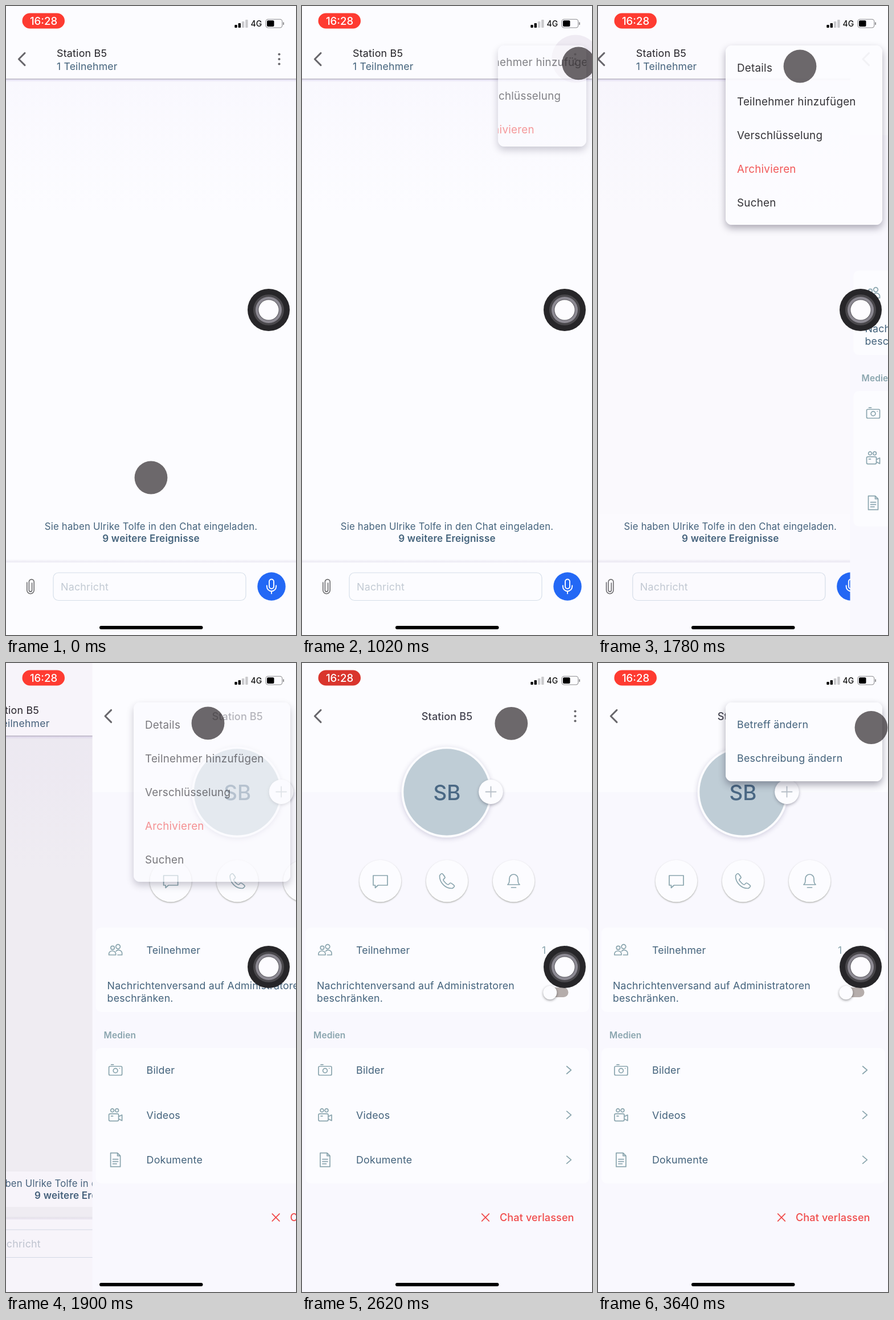
Animation of 509 by 1101 pixels, one loop 3660 ms. Source, as an HTML page with a canvas:

```html
<!DOCTYPE html>
<html lang="de">
<head>
<meta charset="utf-8">
<title>Chat</title>
<style>
html, body { margin: 0; width: 100%; height: 100%; overflow: hidden; background: #fcfcff; }
canvas { display: block; width: 509px; height: 1101px; }
</style>
</head>
<body>
<canvas id="stage"></canvas>
<script>
const W = 509, H = 1101, LOOP = 3660;
const canvas = document.getElementById('stage');
const ctx = canvas.getContext('2d');
const dpr = window.devicePixelRatio || 1;
canvas.width = W * dpr;
canvas.height = H * dpr;

const PAPER = '#fcfcff', TINT = '#f9f8fe', SLATE = '#44637c', ICON = '#8aa5ae',
      RED = '#f04c4c', GREY = '#68676c', INK = '#242328';
const SLIDE_AT = 1756;

const clamp = (v, a = 0, b = 1) => Math.min(b, Math.max(a, v));
const ramp = (t, from, span) => clamp((t - from) / span);
const smooth = u => u * u * (3 - 2 * u);
const mix = (a, b, u) => a + (b - a) * u;

// Fast start, long settling: cubic bezier (.35,.91) (.33,.97)
function settle(x) {
  const bez = (u, a, b) => 3 * u * (1 - u) ** 2 * a + 3 * u * u * (1 - u) * b + u ** 3;
  let lo = 0, hi = 1;
  for (let i = 0; i < 24; i++) {
    const mid = (lo + hi) / 2;
    if (bez(mid, 0.35, 0.33) < x) lo = mid; else hi = mid;
  }
  return bez(lo, 0.91, 0.97);
}

// y is the middle of the capital letters
function label(str, x, y, size, color, { weight = 400, align = 'left', gap = 0 } = {}) {
  ctx.font = `${weight} ${size}px Inter, "Open Sans", sans-serif`;
  ctx.letterSpacing = gap + 'px';
  ctx.textAlign = align;
  ctx.fillStyle = color;
  ctx.fillText(str, x, y + size * 0.364);
}

function box(x, y, w, h, r, fill, stroke, line = 1) {
  ctx.beginPath();
  ctx.roundRect(x, y, w, h, r);
  if (fill) { ctx.fillStyle = fill; ctx.fill(); }
  if (stroke) { ctx.strokeStyle = stroke; ctx.lineWidth = line; ctx.stroke(); }
}

function disc(x, y, r, fill) {
  ctx.beginPath();
  ctx.arc(x, y, r, 0, Math.PI * 2);
  ctx.fillStyle = fill;
  ctx.fill();
}

function shade(color, blur, dy, draw) {
  ctx.save();
  ctx.shadowColor = color;
  ctx.shadowBlur = blur * dpr;
  ctx.shadowOffsetY = dy * dpr;
  draw();
  ctx.restore();
}

function icon(path, x, y, color = ICON, line = 1.7) {
  ctx.save();
  ctx.translate(x, y);
  ctx.strokeStyle = color;
  ctx.lineWidth = line;
  ctx.lineJoin = ctx.lineCap = 'round';
  ctx.stroke(new Path2D(path));
  ctx.restore();
}

const ring = (x, y, r) => `M${x + r} ${y}a${r} ${r} 0 1 1 ${-2 * r} 0a${r} ${r} 0 1 1 ${2 * r} 0`;

const ICONS = {
  bubble: 'M-12.5-9.5H12.5V7.5H-4L-9 12V7.5H-12.5Z',
  phone: 'M-9-13C-10-13-13-10.5-13-8.5C-13 3-3 13 8.5 13C10.5 13 13 10 13 9C13 7.5 7 3.5 6 3.5' +
         'C4.5 3.5 3.5 6.5 2 6.5C0 6.5-6.5 0-6.5-2C-6.5-3.5-3.5-4.5-3.5-6C-3.5-7-7.5-13-9-13Z',
  bell: 'M-10.5 6.5C-7.5 4-7.5 1-7.5-4A7.5 7.5 0 0 1 7.5-4C7.5 1 7.5 4 10.5 6.5ZM-4 11.5H4',
  people: ring(-5, -3.5, 3.2) + ring(4.5, -5.5, 3.8) +
          'M-11.5 9V7a6 5 0 0 1 12 0V9ZM1 2.5a6 6 0 0 1 10.5 4.5V9H4',
  photo: 'M-9.5-6.5H9.5a2 2 0 0 1 2 2V7a2 2 0 0 1-2 2H-9.5a2 2 0 0 1-2-2V-4.5a2 2 0 0 1 2-2ZM-7.5-9.3h4M7.2-3h.2' +
         ring(0, 1, 3.9),
  film: ring(-5.5, -8, 2.9) + ring(2.5, -8, 2.9) +
        'M-9.5-2H3.5a2 2 0 0 1 2 2V8.5a2 2 0 0 1-2 2H-9.5a2 2 0 0 1-2-2V0a2 2 0 0 1 2-2ZM5.5 3L11.5 0V10L5.5 7M-7.5 2h3',
  sheet: 'M-8.5-12H3.5L8.5-7V12H-8.5ZM3.5-12V-7H8.5M-4.5-1H4.5M-4.5 3H4.5M-4.5 7H2',
  back: 'M6-10.6L-4.6 0L6 10.6',
  next: 'M-3.8-6.5L3.8 0L-3.8 6.5',
  plus: 'M-9 0H9M0-9V9',
  cross: 'M-6.3-6.3L6.3 6.3M6.3-6.3L-6.3 6.3',
  clip: 'M2.6-6V6.5a2.6 2.6 0 0 1-5.2 0V-8a4.4 4.4 0 0 1 8.8 0V6.5a6.2 6.2 0 0 1-12.4 0V-7',
  mic: 'M-4-8.5a4 4 0 0 1 8 0V0a4 4 0 0 1-8 0ZM-8.2-1.5V0a8.2 8.2 0 0 0 16.4 0V-1.5M0 8.2V12.5'
};

function kebab() {
  for (const y of [84.5, 93, 101.5]) disc(479.5, y, 2.1, GREY);
}

function fade(y0, y1, from, to) {
  const g = ctx.createLinearGradient(0, y0, 0, y1);
  g.addColorStop(0, from);
  g.addColorStop(1, to);
  ctx.fillStyle = g;
  ctx.fillRect(0, y0, W, y1 - y0);
}

function chatPage(dim) {
  ctx.fillStyle = PAPER;
  ctx.fillRect(0, 0, W, H);
  fade(128, 360, TINT, PAPER);
  fade(127, 129, '#b9b6c2', '#d3d0dd');
  fade(129, 133, 'rgba(190,180,225,.35)', 'rgba(190,180,225,0)');
  fade(969, 974, 'rgba(235,233,243,.2)', 'rgba(235,233,243,1)');

  icon(ICONS.back, 27, 93, GREY, 3);
  label('Station B5', 89, 82, 17.9, INK, { gap: 0.2 });
  label('1 Teilnehmer', 89, 106, 17.7, SLATE, { gap: 0.15 });
  kebab();

  label('Sie haben Ulrike Tolfe in den Chat eingeladen.', W / 2, 911, 16.75, SLATE, { align: 'center', gap: 0.2 });
  label('9 weitere Ereignisse', W / 2, 931.5, 17.1, SLATE, { weight: 600, align: 'center', gap: 0.2 });

  icon(ICONS.clip, 43, 1016, '#6c6c6e', 1.6);
  box(83, 992, 338, 48.5, 9, PAPER, '#d6dfe9', 1.2);
  label('Nachricht', 96, 1016, 17.9, '#c2cad3', { gap: 0.2 });
  disc(466, 1016, 24.7, '#2368f5');
  icon(ICONS.mic, 466, 1016, '#fff', 1.9);

  if (dim > 0) {
    ctx.fillStyle = `rgba(120,40,120,${0.05 * dim})`;
    ctx.fillRect(0, 0, W, H);
    ctx.fillStyle = `rgba(0,20,10,${0.045 * dim})`;
    ctx.fillRect(0, 130, W, 760);
    ctx.fillRect(0, 952, W, 20);
  }
}

function detailPage() {
  ctx.fillStyle = PAPER;
  ctx.fillRect(0, 0, W, 226);
  ctx.fillStyle = TINT;
  ctx.fillRect(0, 226, W, H - 226);

  icon(ICONS.back, 27, 93, GREY, 3);
  label('Station B5', W / 2, 93, 18.1, '#43434f', { weight: 500, align: 'center', gap: 0.1 });
  kebab();

  shade('rgba(70,60,110,.22)', 8, 2, () => disc(254, 226, 79.5, PAPER));
  disc(254, 226, 75.7, '#bfcdd6');
  label('SB', 254.5, 227, 36.7, '#4a6884', { weight: 500, align: 'center' });
  shade('rgba(60,60,80,.38)', 5, 2, () => disc(331.5, 225.5, 21.4, PAPER));
  icon(ICONS.plus, 331.5, 225.5, '#b7bfc8', 1.8);

  [ICONS.bubble, ICONS.phone, ICONS.bell].forEach((shape, i) => {
    const x = 137.5 + i * 117;
    shade('rgba(70,75,55,.45)', 2.5, 1.2, () => disc(x, 381.5, 36.8, PAPER));
    icon(shape, x, 381.5);
  });

  box(6, 463, 498, 148, 9, PAPER);
  icon(ICONS.people, 40.5, 502);
  label('Teilnehmer', 95, 502.5, 17.75, SLATE, { gap: 0.15 });
  label('1', 421, 502.5, 17.75, ICON);
  icon(ICONS.next, 468.5, 502);
  label('Nachrichtenversand auf Administratoren', 26, 565, 17.75, SLATE, { gap: 0.2 });
  label('beschränken.', 26, 587, 17.75, SLATE, { gap: 0.2 });
  box(430, 568, 37.5, 17, 8.5, '#b5adab');
  shade('rgba(0,0,0,.4)', 4, 1.5, () => disc(435.3, 577, 12, PAPER));

  label('Medien', 20, 651, 15.5, ICON, { weight: 600, gap: 0.1 });
  box(6, 674, 498, 237, 9, PAPER);
  const rows = [['Bilder', ICONS.photo], ['Videos', ICONS.film], ['Dokumente', ICONS.sheet]];
  rows.forEach(([name, shape], i) => {
    const y = 712.5 + i * 78.6;
    icon(shape, 40.5, y);
    label(name, 95, y, 17.85, SLATE, { gap: 0.2 });
    icon(ICONS.next, 468.5, y);
  });

  icon(ICONS.cross, 322, 970.5, RED, 1.8);
  label('Chat verlassen', 347, 970.5, 18.1, RED, { weight: 500, gap: 0.1 });
}

// Grows from its upper right corner, the items stay centred in it
function menu(items, height, grow, alpha, size) {
  if (grow <= 0 || alpha <= 0) return;
  const right = 499, top = 69, full = 275;
  const w = full * grow, h = height * grow, x = right - w;
  ctx.save();
  ctx.globalAlpha = alpha;

  ctx.save();
  ctx.beginPath();
  ctx.rect(0, 0, W, H);
  ctx.roundRect(x, top, w, h, 11);
  ctx.clip('evenodd');
  shade('rgba(30,25,50,.38)', 13, 6, () => box(x, top, w, h, 11, PAPER));
  ctx.restore();

  box(x, top, w, h, 11, PAPER);
  ctx.clip();
  ctx.translate((full - w) / 2, (h - height) / 2);
  items.forEach(([name, color], i) => label(name, 244, 108 + i * 59, size, color, { gap: 0.25 }));
  ctx.restore();
}

const CHAT_MENU = [['Details', INK], ['Teilnehmer hinzufügen', INK], ['Verschlüsselung', INK],
                   ['Archivieren', RED], ['Suchen', INK]];
const DETAIL_MENU = [['Betreff ändern', SLATE], ['Beschreibung ändern', SLATE]];

function ripple(t, start) {
  const r = mix(14, 42, smooth(ramp(t, start, 190)));
  const a = ramp(t, start, 60) * (1 - ramp(t, start + 220, 180));
  if (a > 0) disc(480, 92.5, r, `rgba(110,70,120,${0.09 * a})`);
}

function statusBar(t) {
  // Recording badge darkens briefly once per period
  const d = Math.abs((t - 160 + 640 + 1280) % 1280 - 640);
  const dark = clamp((160 - d) / 60);
  const tone = (a, b) => Math.round(mix(a, b, dark));
  box(28.5, 12.5, 74.5, 27, 13.5, `rgb(${tone(254, 217)},${tone(59, 53)},${tone(49, 45)})`);
  label('16:28', 66, 26.2, 18.6, '#fff', { weight: 500, align: 'center' });

  for (let i = 0; i < 4; i++) {
    const h = 5 + i * 3;
    box(401.3 + i * 6.3, 38 - h, 4.4, h, 1, i < 2 ? '#000' : '#c9c9cc');
  }
  label('4G', 429.5, 31, 14, '#111', { weight: 500 });
  box(456, 23.2, 28.8, 14.8, 4, null, '#8b8b8e', 1.1);
  box(458, 25.2, 12.5, 10.8, 2, '#000');
  box(486.2, 28.2, 1.8, 5, 1, '#8b8b8e');
}

function floatButton() {
  const rings = [[37, '#272629'], [27, '#4a484c'], [23, '#8e8b94'], [18.8, '#66646a'], [17.6, '#fdfcff']];
  for (const [r, color] of rings) disc(461, 532, r, color);
}

// time, x, y
const TRACK = [
  [60, 254.5, 825.5], [540, 476, 108], [850, 485, 100.7], [1340, 486, 99.5],
  [1400, 486, 99.5], [1680, 354.5, 105.5], [2490, 354.5, 105], [3150, 479.5, 113]
];

function pointer(t) {
  let [, x, y] = TRACK[0];
  for (let i = 1; i < TRACK.length; i++) {
    const [t0, x0, y0] = TRACK[i - 1], [t1, x1, y1] = TRACK[i];
    if (t < t0) break;
    const u = smooth(ramp(t, t0, t1 - t0));
    x = mix(x0, x1, u);
    y = mix(y0, y1, u);
  }
  disc(x, y, 28.9, 'rgba(40,35,38,.68)');
}

function draw(t) {
  ctx.setTransform(dpr, 0, 0, dpr, 0, 0);
  ctx.clearRect(0, 0, W, H);

  const slide = settle(ramp(t, SLIDE_AT, 500));
  if (slide < 0.999) {
    ctx.save();
    ctx.translate(-slide * W / 3, 0);
    chatPage(slide);
    ctx.restore();
  }
  if (t > SLIDE_AT) {
    ctx.save();
    ctx.translate(slide < 0.999 ? (1 - slide) * W : 0, 0);
    detailPage();
    ctx.restore();
  }

  ripple(t, 800);
  ripple(t, 3220);
  const open = ramp(t, 852, 300), close = ramp(t, SLIDE_AT, 370);
  menu(CHAT_MENU, 314, open, open * (1 - close), 18.8);
  const second = ramp(t, 3270, 300);
  menu(DETAIL_MENU, 138, second, second, 17.85);

  statusBar(t);
  box(164, 1085, 181.5, 6, 3, '#000');
  floatButton();
  pointer(t);
}

const begin = performance.now();
function tick() {
  draw((performance.now() - begin) % LOOP);
  requestAnimationFrame(tick);
}
tick();
</script>
</body>
</html>
```
